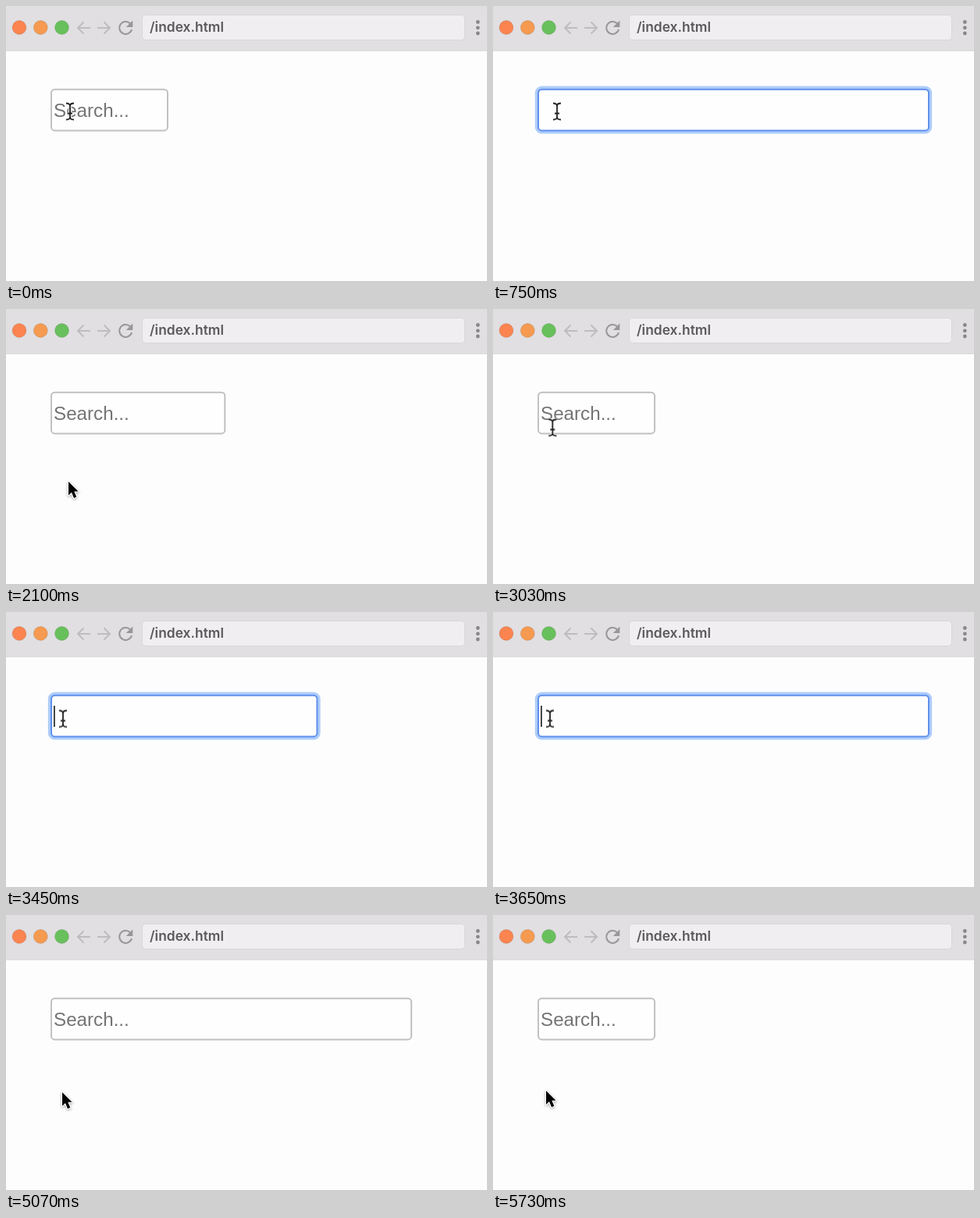
An HTML page for the animation above (6.1 s loop, 616x352 px).

```html
<!DOCTYPE html>
<html lang="en">
<head>
<meta charset="utf-8">
<title>Expanding search field</title>
<style>
  html, body { margin: 0; width: 100%; height: 100%; overflow: hidden; background: #fdfdfe; }
  svg { display: block; width: 100vw; height: 100vh; }

  .icon { fill: none; stroke-width: 2; }
  .url { font: 600 17.4px Inter, sans-serif; fill: #5b595b; }
  .placeholder { font: 24.2px "Liberation Sans", Arial, sans-serif; fill: #757475; }
  .light { stroke: rgba(0, 0, 0, .1); stroke-width: 1; }

  .box { width: 149px; fill: #fefefe; stroke-width: 2; animation: grow 6.1s ease-in-out infinite; }
  .halo { fill: none; stroke: #fff; stroke-width: 4; stroke-opacity: .8; }
  .stem { fill: none; stroke: #222; stroke-width: 1.8; }
  .pointer { animation: move 6.1s infinite; }
  .arrow path { stroke: #fff; stroke-width: 2.4; stroke-linejoin: round; paint-order: stroke; }
  .arrow { filter: drop-shadow(0 1.5px 1.5px rgba(0, 0, 0, .35)); }

  .focused, .placeholder, .caret, .beam, .arrow { animation: 6.1s step-end infinite; }
  .focused { animation-name: focus; }
  .placeholder { animation-name: blur; }
  .caret { animation-name: blink; }
  .beam { animation-name: beam; }
  .arrow { animation-name: arrow; }

  /* The field is focused from 4% to 30% and from 53.1% to 81.6%. */
  @keyframes grow {
    0%, 4%, 36.5%, 53.1%, 88.2%, 100% { width: 149px; }
    10.6%, 30%, 59.7%, 81.6% { width: 500px; }
  }
  @keyframes focus {
    0%, 30%, 81.6%, 100% { opacity: 0; }
    4%, 53.1% { opacity: 1; }
  }
  @keyframes blur {
    0%, 30%, 81.6%, 100% { opacity: 1; }
    4%, 53.1% { opacity: 0; }
  }
  @keyframes blink {
    0%, 12.1%, 28.5%, 61.3%, 77.7%, 100% { opacity: 0; }
    4%, 20.3%, 53.1%, 69.5% { opacity: 1; }
  }

  @keyframes move {
    0% { transform: translate(82px, 135px); }
    19.7% { transform: translate(82px, 135px); animation-timing-function: ease-in-out; }
    28.8%, 45.6% { transform: translate(80px, 221px); animation-timing-function: linear; }
    49.7% { transform: translate(76.3px, 151.6px); animation-timing-function: ease-out; }
    53.1%, 71% { transform: translate(73px, 136.6px); animation-timing-function: ease-in; }
    75.2% { transform: translate(73px, 160px); animation-timing-function: ease-out; }
    79.5%, 92% { transform: translate(72px, 227px); }
    93.9%, 100% { transform: translate(68px, 225px); }
  }
  @keyframes beam {
    0%, 49% { opacity: 1; }
    23%, 75.5%, 100% { opacity: 0; }
  }
  @keyframes arrow {
    0%, 49% { opacity: 0; }
    23%, 75.5%, 100% { opacity: 1; }
  }
</style>
</head>
<body>
<svg viewBox="0 0 616 352">
  <defs>
    <path id="beam" d="M-5 -10.5Q0 -10.5 0 -7Q0 -10.5 5 -10.5M0 -7V7M-5 10.5Q0 10.5 0 7Q0 10.5 5 10.5M-3 2.5H3"/>
  </defs>

  <rect width="616" height="352" fill="#fdfdfe"/>
  <rect width="616" height="57.5" fill="#e1dfe2"/>
  <rect y="56.7" width="616" height="1" fill="#dad8db"/>

  <circle class="light" cx="17" cy="27.5" r="9" fill="#fb8450"/>
  <circle class="light" cx="44.3" cy="27.5" r="9" fill="#f59a50"/>
  <circle class="light" cx="71.5" cy="27.5" r="9" fill="#68c05c"/>

  <g class="icon" stroke="#bebcbf">
    <path d="M108 28H92M99.5 20.5L92 28L99.5 35.5"/>
    <path d="M117 28H133M125.5 20.5L133 28L125.5 35.5"/>
  </g>
  <path class="icon" stroke="#989699" d="M159 22.3A8 8 0 1 0 161 30"/>
  <path fill="#989699" d="M162.3 18.5V27H153.8Z"/>

  <rect x="174.5" y="11.5" width="413" height="32" rx="4" fill="#f0eef1" stroke="#d8d6d9"/>
  <text class="url" x="184" y="33">/index.html</text>
  <g fill="#89878a">
    <circle cx="604.3" cy="20.5" r="2.4"/>
    <circle cx="604.3" cy="27.8" r="2.4"/>
    <circle cx="604.3" cy="35" r="2.4"/>
  </g>

  <rect class="box" x="58" y="106.7" height="52.7" rx="4.5" stroke="#c2c0c2"/>
  <text class="placeholder" x="61" y="142.2">Search...</text>
  <g class="focused">
    <rect class="box" x="58" y="106.7" height="52.7" rx="4.5" stroke="#aecdf9" style="stroke-width: 8.4px"/>
    <rect class="box" x="58" y="106.7" height="52.7" rx="4.5" stroke="#608fed"/>
  </g>
  <rect class="caret" x="61" y="120" width="1.8" height="27" fill="#333"/>

  <g class="pointer">
    <g class="beam">
      <use class="halo" href="#beam"/>
      <use class="stem" href="#beam"/>
    </g>
    <g class="arrow">
      <path d="M0 0V17.5L4 13.8L7 21L10.3 19.6L7.3 12.6H12.6Z"/>
    </g>
  </g>
</svg>
</body>
</html>
```
